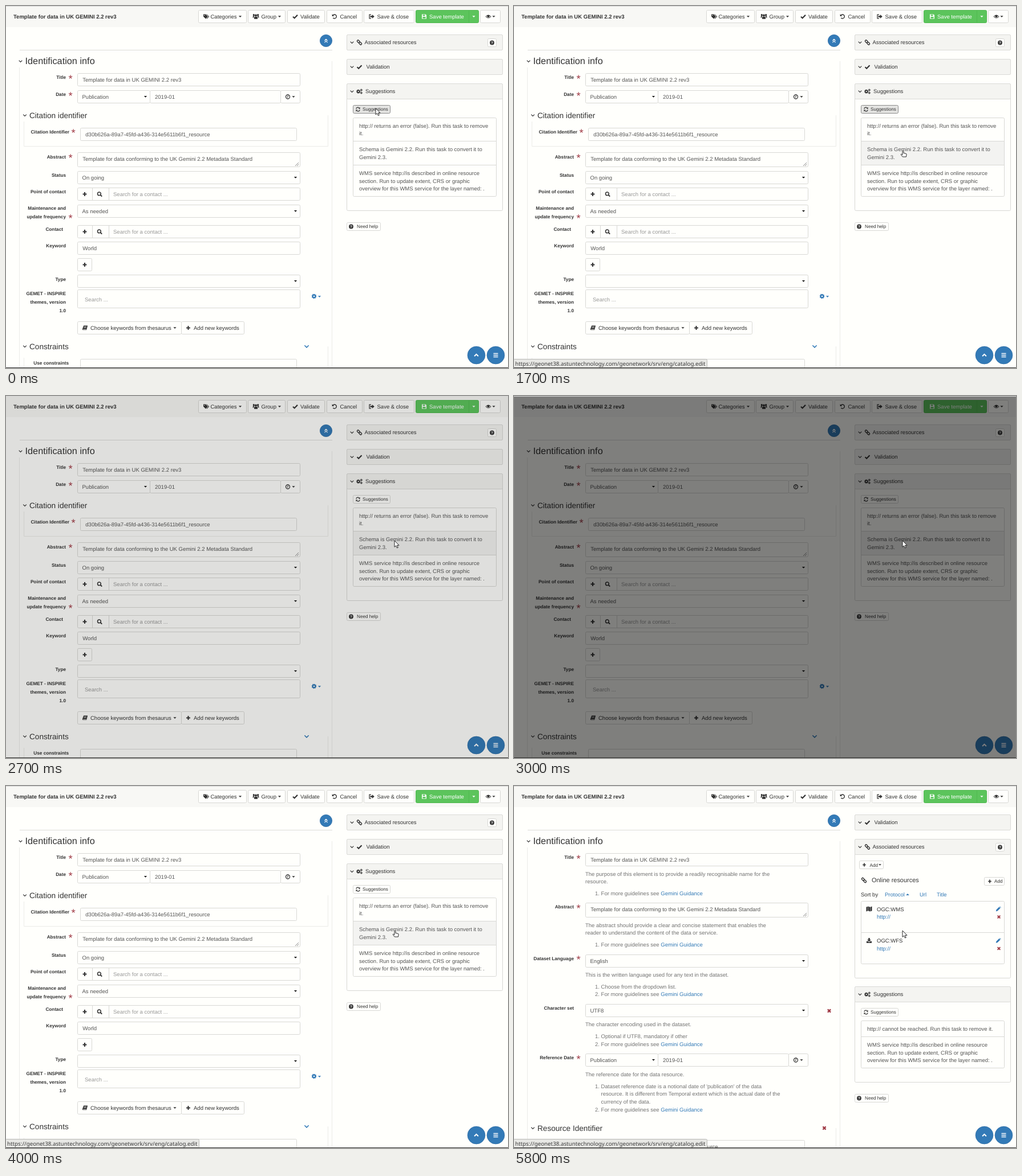
Write an HTML page that moves like this. It is 880 by 636 pixels and loops after 8000 ms.

```html
<!DOCTYPE html>
<html lang="en">
<head>
<meta charset="utf-8">
<title>Metadata editor</title>
<style>
html, body { margin: 0; width: 100%; height: 100%; overflow: hidden; background: #fffffc; }
svg { display: block; font-family: "Liberation Sans", Arial, sans-serif; text-rendering: geometricPrecision; }
</style>
</head>
<body>
<svg id="stage" width="880" height="636" viewBox="0 0 880 636"></svg>
<script>
const BLUE = '#337ab7', RED = '#a03a45', INK = '#333', GREY = '#555', HELP = '#737373', EDGE = '#d8d8d5', PAPER = '#fffffc';
const SMALL = 8.16, BODY = 9.52, LEFT = 125, RIGHT = 516;

// y is the vertical middle of the text; baselines sit on whole pixels
const text = (x, y, s, color = GREY, size = BODY, attrs = '') =>
  `<text x="${x}" y="${Math.round(y + size * .35)}" fill="${color}" font-size="${size}" ${attrs}>${s}</text>`;
const box = (x1, y1, x2, y2, fill = PAPER, stroke = EDGE, r = 2, attrs = '') =>
  `<rect x="${x1 + .5}" y="${y1 + .5}" width="${x2 - x1 - 1}" height="${y2 - y1 - 1}" rx="${r}" fill="${fill}" stroke="${stroke}" ${attrs}/>`;
const line = (d, color = '#ebebe8', width = 1) => `<path d="${d}" fill="none" stroke="${color}" stroke-width="${width}"/>`;
const group = (id, ...parts) => `<g id="${id}">${parts.join('')}</g>`;
const lines = (x, ys, rows, color) => rows.map((s, i) => text(x, ys[i], s, color)).join('');

const stroke = (d, w = 1.5) => `<path d="${d}" fill="none" stroke="currentColor" stroke-width="${w}"/>`;
const solid = d => `<path d="${d}" fill-rule="evenodd"/>`;
const gear = (x, y, r) => `<circle cx="${x}" cy="${y}" r="${r * .66}" fill="none" stroke="currentColor" stroke-width="${r * .6}"/>` +
  `<circle cx="${x}" cy="${y}" r="${r}" fill="none" stroke="currentColor" stroke-width="${r * .4}" stroke-dasharray="${r * .39}"/>`;
const icons = {
  tags: solid('M-5-4H-1L3 0-1 4-5 0ZM-3.8-2.8v1.4h1.4v-1.4Z') + solid('M0-4H1L5.3 0 1.3 4 .6 3.3 4 0Z'),
  users: solid('M-2-2a2 2 0 1 1 4 0a2 2 0 1 1-4 0M-3 4.2V2Q-3 .3-1.5.3h3Q3 .3 3 2v2.2ZM-5-2.5a1.4 1.4 0 1 1 2.6 0a1.4 1.4 0 1 1-2.6 0M2.4-2.5a1.4 1.4 0 1 1 2.6 0a1.4 1.4 0 1 1-2.6 0M-5.4 2V0Q-5-.8-3-.5L-3.8 2ZM5.4 2V0Q5-.8 3-.5L3.8 2Z'),
  check: stroke('M-4 .2L-1.3 2.8 4-2.8', 2.1),
  undo: stroke('M-3-2.2A3.5 3.5 0 1 1-2.8 2.3', 1.4) + solid('M-4.4-4.2V-.6H-.8Z'),
  exit: stroke('M-1-3.3H-4V3.3H-1', 1.2) + solid('M-2.5-1.2H.8V-3.6L4.8 0 .8 3.6V1.2H-2.5Z'),
  floppy: solid('M-4-4H2.4L4-2.4V4H-4ZM-2.4-3.2V-1H1.6V-3.2ZM-2.6.6V3.2H2.6V.6Z'),
  eye: solid('M-5 0Q0-6.2 5 0Q0 6.2-5 0ZM-3.8 0Q0 4.6 3.8 0Q3-1.4 2-1.8A2.3 2.3 0 1 1-2-1.8Q-3-1.4-3.8 0Z'),
  link: `<g transform="rotate(45)" fill="none" stroke="currentColor" stroke-width="1.4"><rect x="-5" y="-1.7" width="5" height="3.4" rx="1.7"/><rect x="0" y="-1.7" width="5" height="3.4" rx="1.7"/></g>`,
  gear: gear(0, 0, 3.6),
  gears: gear(-1.8, .2, 3) + gear(3.4, -2.4, 1.7) + gear(3.4, 2.6, 1.7),
  refresh: stroke('M-3.2-.8A3.2 3.2 0 0 1 2.6-2M3.2.8A3.2 3.2 0 0 1-2.6 2', 1.2) + solid('M3.6-3.8V-.8H.6ZM-3.6 3.8V.8H-.6Z'),
  help: `<circle r="3.9"/>` + text(0, .1, '?', '#fff', 6.6, 'text-anchor="middle" font-weight="bold"'),
  plus: stroke('M-3.4 0H3.4M0-3.4V3.4', 2),
  search: `<circle cx="-.6" cy="-.6" r="2.9" fill="none" stroke="currentColor" stroke-width="1.5"/>` + stroke('M1.5 1.5L4.2 4.2', 1.9),
  clock: `<circle r="3.5" fill="none" stroke="currentColor" stroke-width="1.3"/>` + stroke('M.2-2V.6H-1.6', 1),
  book: solid('M-2.4-4H4.6L2.6 3.8H-4Q-5 3-4.4 1.6ZM-1.6-2.6L-1.8-1.9H2.4L2.6-2.6ZM-2-1L-2.2-.3H2L2.2-1ZM-3.6 2.2V2.9H2L2.2 2.2Z'),
  pencil: solid('M-4.2 4.2L-3.6 1.4 1.4-3.6 3.6-1.4-1.4 3.6ZM2-4.2L2.8-4.6 4.6-2.8 4.2-2Z'),
  cross: stroke('M-2.6-2.6L2.6 2.6M2.6-2.6L-2.6 2.6', 2.2),
  map: solid('M-5-3.2L-2-4.4V3.2L-5 4.4ZM-1.5-4.4L1.5-3.2V4.4L-1.5 3.2ZM2-3.2L5-4.4V3.2L2 4.4Z'),
  download: solid('M-1.3-4.4H1.3V-1.4H3.4L0 2-3.4-1.4H-1.3ZM-4.6 1.2H-2L0 3 2 1.2H4.6V4.2H-4.6Z'),
  caret: solid('M-2.6-1.3H2.6L0 1.4Z'),
  caretUp: solid('M-2.8 1.4H2.8L0-1.4Z'),
  down: stroke('M-2.8-1.4L0 1.4 2.8-1.4', 1.2),
  up: stroke('M-3.4 1.8L0-1.6 3.4 1.8', 2),
  upTwice: stroke('M-2.6 0L0-2.6 2.6 0M-2.6 3.2L0 .6 2.6 3.2', 1.1),
  menu: stroke('M-4-3H4M-4 0H4M-4 3H4', 1.6)
};
const icon = (name, x, y, color = INK, scale = 1) =>
  `<g transform="translate(${x} ${y}) scale(${scale})" color="${color}" fill="${color}">${icons[name]}</g>`;

const label = (y, s, x = 105) => text(x, y, s, INK, 8.22, 'text-anchor="end" font-weight="bold"');
const star = (y, x = 113) => text(x, y + 2.8, '*', RED, 18.5, 'text-anchor="middle"');
const heading = (y, s) => icon('down', 33, y) + text(41, y, s, INK, 13.6);
const input = (y1, y2, s, x = LEFT, end = RIGHT) => box(x, y1, end, y2) + text(x + 9.3, (y1 + y2) / 2, s);
const select = (y, s, end = RIGHT) => box(LEFT, y, end, y + 23) + text(133.5, y + 11.8, s) + icon('caret', end - 8.5, y + 11.4, '#111');
const area = (y, s) => box(LEFT, y, RIGHT, y + 26) + text(134.3, y + 12, s) + line(`M507 ${y + 24}l6-6M510 ${y + 24}l3-3`, '#888');
const dateRow = y => select(y, 'Publication', 253) + box(252, y, 482, y + 23) + text(261, y + 11.4, '2019-01') +
  box(481, y, RIGHT, y + 23) + icon('clock', 494, y + 11.5) + icon('caret', 504, y + 11.5);
const contactRow = y => box(LEFT, y, RIGHT, y + 23) + line(`M151.5 ${y}v23M180.5 ${y}v23`, EDGE) +
  icon('plus', 138, y + 11.5) + icon('search', 164, y + 11.5) + text(188, y + 11.5, 'Search for a contact ...', '#999');
const guide = (y, n = 1) => text(142, y, `${n}. For more guidelines see <tspan fill="${BLUE}">Gemini Guidance</tspan>`, HELP);
const button = (x1, x2, name, s, tx, caretX) => box(x1, 7, x2, 30) + icon(name, x1 + (s ? 14 : 14.5), 18.5) +
  text(tx, 18.5, s, INK) + (caretX ? icon('caret', caretX, 18.5) : '');
const panel = (y, end, name, s, tx) => box(597, y, 871, end) + box(597, y, 871, y + 28, '#f4f4f1', '#dadad7') +
  icon('down', 606.5, y + 14) + icon(name, 619.5, y + 14) + text(tx, y + 13.8, s, INK);
const helpButton = y => box(844, y, 860, y + 15) + icon('help', 852, y + 7.5);
const needHelp = y => box(597, y, 657, y + 15) + icon('help', 605, y + 7.5) + text(615, y + 7.5, 'Need help', INK, SMALL);
const suggest = (y, id) => box(608, y, 674, y + 15, PAPER, EDGE, 2, `id="${id}"`) + icon('refresh', 617, y + 7.5) +
  text(625, y + 7.5, 'Suggestions', INK, SMALL);
const disc = (x, y, r, name) => `<circle cx="${x}" cy="${y}" r="${r - .4}" fill="${BLUE}" stroke="#2e6da4" stroke-width=".8"/>` + icon(name, x, y, '#fff');
const wms = ['WMS service http://is described in online resource', 'section. Run to update extent, CRS or graphic',
  'overview for this WMS service for the layer named: .'];
const uuid = 'd30b626a-89a7-45fd-a436-314e5611b6f1_resource';
const abstract = 'Template for data conforming to the UK Gemini 2.2 Metadata Standard';
const name = 'Template for data in UK GEMINI 2.2 rev3';

const header = '<path d="M0 0H880V37H0Z" fill="#f8f8f5"/><path d="M0 0H880V1H0Z" fill="#d8d8d6"/>' +
  text(13, 18.5, name, INK, BODY, 'font-weight="bold"') +
  button(337, 422, 'tags', 'Categories', 358.5, 410.5) + button(424, 490, 'users', 'Group', 447.5, 479.5) +
  button(493, 559, 'check', 'Validate', 516) + button(562, 625, 'undo', 'Cancel', 585.5) +
  button(627, 716, 'exit', 'Save &amp; close', 650.5) +
  box(718, 7, 829, 30, '#5cc45c', '#50b950') + line('M811.5 7V30', '#50b950') +
  icon('floppy', 733, 18.5, '#fff') + text(742, 18.5, 'Save template', '#fff') + icon('caret', 820, 18.5, '#fff') +
  button(831, 867, 'eye', '', 0, 855);

const frame = line('M24 77.5H572', '#dcdcd9') + line('M23.5 108V635M571.5 97V635') + disc(561, 61, 11, 'upTwice') +
  icon('down', 25.5, 97) + text(33.5, 96.5, 'Identification info', INK, 16.3) +
  label(125.5, 'Title') + star(125) + input(118, 141, name);

const oldForm = group('oldForm',
  label(155.5, 'Date'), star(155), dateRow(148),
  line('M31.5 203V246.5H564.5V192'), heading(192, 'Citation identifier'),
  label(221, 'Citation Identifier', 111), star(220, 118), input(214, 237, uuid, 130, 510),
  label(265, 'Abstract'), star(264), area(257, abstract),
  label(297, 'Status'), select(290, 'On going'),
  label(326.5, 'Point of contact'), contactRow(319),
  label(355.5, 'Maintenance and'), label(370.5, 'update frequency'), star(370), select(349, 'As needed'),
  label(392, 'Contact', 100), contactRow(385),
  label(421.5, 'Keyword'), input(414, 437, 'World'), box(LEFT, 443, 151, 466), icon('plus', 138, 454.5),
  label(480, 'Type'), select(472, ''),
  label(505.5, 'GEMET - INSPIRE'), label(520.5, 'themes, version'), label(535.5, '1.0'),
  box(LEFT, 498, RIGHT, 531), text(138, 516, 'Search ...', '#999'), icon('gear', 540, 510, BLUE), icon('caret', 549.5, 510.5, BLUE),
  box(LEFT, 554, 308, 577), icon('book', 138.5, 565.5), text(148, 565.5, 'Choose keywords from thesaurus', INK), icon('caret', 296, 565.5),
  box(307, 554, 418, 577), icon('plus', 319.5, 565.5), text(329, 565.5, 'Add new keywords', INK),
  line('M31.5 618V635M564.5 598V635'), heading(598, 'Constraints'), icon('down', 527, 598, BLUE, 1.3),
  label(627.5, 'Use constraints', 110), box(130, 620, 510, 645));

const newForm = group('newForm',
  lines(125, [154.5, 168], ['The purpose of this element is to provide a readily recognisable name for the', 'resource.'], HELP), guide(188.5),
  label(212.5, 'Abstract'), star(212), area(205, abstract),
  lines(125, [244.5, 258], ['The abstract should provide a clear and concise statement that enables the',
    'reader to understand the content of the data or service.'], HELP), guide(279),
  label(303, 'Dataset Language'), star(302), select(296, 'English'),
  text(125, 331.5, 'This is the written language used for any text in the dataset.', HELP),
  text(142, 352.5, '1. Choose from the dropdown list.', HELP), guide(366, 2),
  label(390.5, 'Character set'), select(383, 'UTF8'), icon('cross', 552.5, 395, RED),
  text(125, 419, 'The character encoding used in the dataset.', HELP),
  text(142, 440, '1. Optional if UTF8, mandatory if other', HELP), guide(453.5, 2),
  label(477.5, 'Reference Date'), star(477), dateRow(470),
  text(125, 507, 'The reference date for the data resource.', HELP),
  text(142, 527.5, "1. Dataset reference date is a notional date of 'publication' of the data", HELP),
  lines(152.6, [541, 555], ['resource. It is different from Temporal extent which is the actual date of the', 'currency of the data.'], HELP), guide(568.5, 2),
  line('M31.5 620V635M564.5 601V635'), heading(601, 'Resource Identifier'), icon('cross', 544, 601, RED),
  input(622, 646, uuid, 130, 510));

const oldSide = group('oldSide',
  panel(50, 78, 'link', 'Associated resources', 628.5), helpButton(57),
  panel(93, 121, 'check', 'Validation', 631.5),
  panel(136, 360, 'gears', 'Suggestions', 630), suggest(174, 'press'),
  '<path id="row1" d="M609 197H859V237H609Z" fill="#f3f3f1"/><path id="row2" d="M609 238H859V279H609Z" fill="#f3f3f1"/>',
  box(608, 196, 860, 335, 'none'), line('M608 237.5H860M608 279.5H860', EDGE),
  lines(619, [210.5, 224, 252, 265.5, 293.5, 307.5, 321], ['http:// returns an error (false). Run this task to remove', 'it.',
    'Schema is Gemini 2.2. Run this task to convert it to', 'Gemini 2.3.', ...wms]),
  needHelp(380));

const resource = (y, glyph, s) => icon(glyph, 622.5, y) + text(636, y + .3, s, INK) + text(636, y + 14, 'http://', BLUE) +
  icon('pencil', 849, y, BLUE) + icon('cross', 850, y + 14, RED, .9);
const newSide = group('newSide',
  panel(50, 78, 'check', 'Validation', 631.5),
  panel(93, 338, 'link', 'Associated resources', 628.5), helpButton(100),
  box(605, 131, 648, 146), icon('plus', 614, 138.5, INK, .85), text(623.5, 138.7, 'Add', INK, SMALL), icon('caret', 641.5, 138.5, INK, .9),
  icon('link', 613.5, 165.5), text(627, 165.5, 'Online resources', INK, 10.95),
  box(824, 160, 860, 175), icon('plus', 834, 167.5, INK, .85), text(842, 167.5, 'Add', INK, SMALL),
  text(608, 190.5, 'Sort by', INK), text(650, 190.5, 'Protocol', BLUE), icon('caretUp', 690, 190.5, BLUE),
  text(711, 190.5, 'Url', BLUE), text(741, 190.5, 'Title', BLUE),
  box(608, 202, 860, 313), line('M608 257.5H860', EDGE), resource(216, 'map', 'OGC:WMS'), resource(271.5, 'download', 'OGC:WFS'),
  panel(352, 521, 'gears', 'Suggestions', 630), suggest(390, 'again'),
  box(608, 412, 860, 496), line('M608 440.5H860', EDGE),
  lines(619, [426.5, 454.5, 468.5, 482], ['http:// cannot be reached. Run this task to remove it.', ...wms]),
  needHelp(541));

const overlays = disc(824.5, 613.5, 15.8, 'up') + disc(858.5, 613.5, 15.8, 'menu') +
  group('status', box(-2, 620, 339, 637, '#e7e7e4', '#b9b9b6'),
    text(2, 628.5, 'https://geonet38.astuntechnology.com/geonetwork/srv/eng/catalog.edit', '#3c3c3c', 9.77, 'font-family="Noto Sans, sans-serif"')) +
  '<path id="shade" d="M0 1H880V635H0Z"/><path d="M0 635H880V636H0Z" fill="#30302e"/>' +
  '<g id="pointer" fill="#fff" stroke="#111" stroke-width=".9" stroke-linejoin="round">' +
  '<path id="arrow" d="M0 0V11.3L2.6 9 4.4 13 6.3 12.2 4.5 8.3H8Z"/>' +
  '<path id="hand" d="M0 1.2Q0 0 1 0T2 1.2V4.5L6 5.2Q7.3 5.6 7.1 7.2L6.4 11H.3L-2.6 7.4Q-3 5.8-1.6 6.3L0 7.6Z"/></g>';

const stage = document.getElementById('stage');
stage.innerHTML = header + frame + oldForm + newForm + oldSide + newSide + overlays;
const el = Object.fromEntries([...stage.querySelectorAll('[id]')].map(e => [e.id, e]));
const show = (id, on) => el[id].style.display = on ? '' : 'none';

function draw(t) {
  const step = Math.floor(t / 100) * 100;
  const p = Math.max(0, Math.min(1, (step - 1000) / 500)), ease = p * p * (3 - 2 * p);
  const x = 648 + 33 * ease, y = 179.5 + 74.5 * ease;
  const waiting = t >= 200 && t < 1000;
  const hand = waiting || (t >= 1100 && t < 2500) || (t >= 3800 && t < 5500);
  el.pointer.setAttribute('transform', `translate(${x} ${y})`);
  show('hand', hand);
  show('arrow', !hand);

  el.press.setAttribute('fill', t >= 2200 ? PAPER : waiting ? '#ebebe9' : '#e4e4e2');
  el.press.setAttribute('stroke', t >= 2200 ? EDGE : waiting ? '#adadad' : '#8c8c8c');
  show('row1', y > 196 && y < 238);
  show('row2', y >= 238);

  show('status', (t >= 1700 && t < 2700) || t >= 4000);
  const dim = t >= 2700 && t < 3800 ? Math.min(1, (step - 2600) / 400) / 2 : 0;
  el.shade.setAttribute('opacity', dim);

  show('oldForm', t < 5600);
  show('newForm', t >= 5600);
  show('oldSide', t < 5700);
  show('newSide', t >= 5700);
}

function tick() {
  draw(performance.now() % 8000);
  requestAnimationFrame(tick);
}
tick();
</script>
</body>
</html>
```
